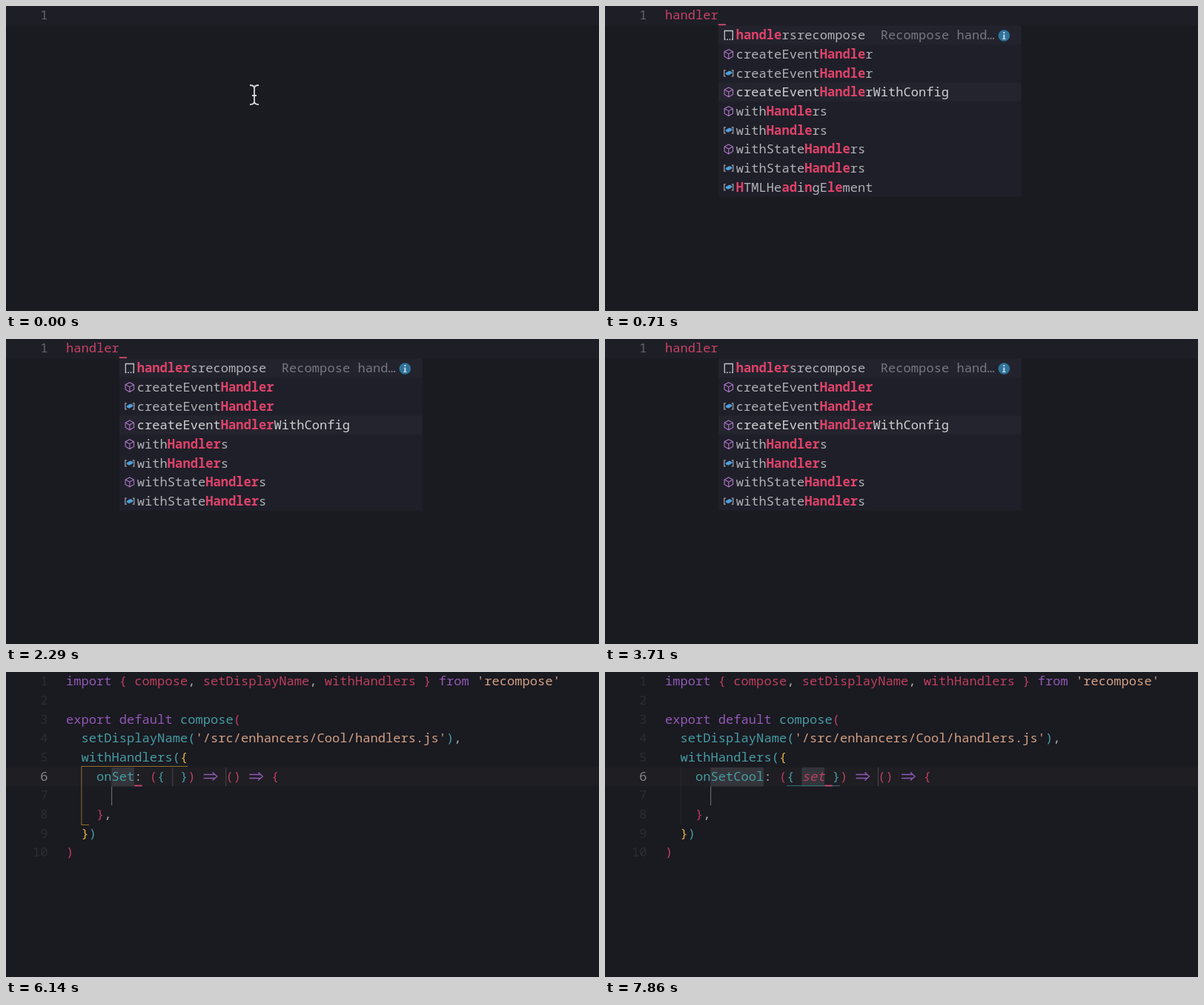
An HTML page with a canvas for the animation above (8000 ms loop, 800 by 412 pixels).

```html
<!DOCTYPE html>
<html>
<head>
<meta charset="utf-8">
<style>
  html, body { margin: 0; height: 100%; overflow: hidden; background: #1a1a21; }
  canvas { display: block; }
</style>
</head>
<body>
<canvas id="stage" width="800" height="412"></canvas>
<script>
const ctx = document.getElementById('stage').getContext('2d');
const LOOP = 8000, CHAR = 10.26, LINE = 25.67, LEFT = 81;
const FONT = '17.1px "Noto Sans Mono", monospace';
const COLORS = { p: '#9159b4', r: '#bd3f5e', t: '#469ca2', s: '#d3a083', y: '#e3b341', g: '#a9a9b0' };

const ACCEPTED = 4400, NEXT_FIELD = 7130;
const typed = [[140, 'h'], [280, 'han'], [425, 'hand'], [565, 'handle'], [705, 'handler']];
const queries = [[280, 'h'], [425, 'han'], [565, 'hand'], [705, 'handle'], [855, 'handler']];
const nameTyped = [[5565, 'S'], [5705, 'Se'], [5855, 'Set'], [6285, 'SetC'], [6425, 'SetCo'], [6565, 'SetCoo'], [6705, 'SetCool']];
const propTyped = [[7425, 's'], [7565, 'se'], [7705, 'set']];

// Asterisks mark the matched letters of loose matches.
const suggestions = [
  ['snippet', 'handlersrecompose'],
  ['cube', 'createEventHandler'], ['value', 'createEventHandler'],
  ['cube', 'createEventHandlerWithConfig'],
  ['cube', 'withHandlers'], ['value', 'withHandlers'],
  ['cube', 'withStateHandlers'], ['value', 'withStateHandlers'],
  ['value', '*H*TMLHe*ad*i*n*gE*le*ment'],
  ['value', '*H*TMLHe*ad*Element'], ['value', '*H*TMLHtmlElement'], ['value', '*H*TMLHRElement']
];

const code = [
  [0, 0, 'p', 'import ', 'r', '{ compose', 'g', ', ', 'r', 'setDisplayName', 'g', ', ', 'r', 'withHandlers } ', 'p', 'from ', 's', "'recompose'"],
  [2, 0, 'p', 'export default ', 't', 'compose', 'r', '('],
  [3, 2, 't', 'setDisplayName(', 's', "'/src/enhancers/Cool/handlers.js'", 't', ')', 'g', ','],
  [4, 2, 't', 'withHandlers(', 'y', '{'],
  [7, 4, 'r', '}', 'g', ','],
  [8, 2, 'y', '}', 't', ')'],
  [9, 0, 'r', ')']
];

const colX = col => LEFT + col * CHAR;
const latest = (steps, t) => steps.reduce((found, [at, value]) => t >= at ? value : found, '');

function rect(x, y, w, h, color) {
  ctx.fillStyle = color;
  ctx.fillRect(x, y, w, h);
}

function text(x, y, str, color, style = '') {
  ctx.font = style + ' ' + FONT;
  ctx.fillStyle = color;
  [...str].forEach((ch, i) => ctx.fillText(ch, x + i * CHAR, y));
  return x + str.length * CHAR;
}

function stroke(path, color, width = 1) {
  ctx.strokeStyle = color;
  ctx.lineWidth = width;
  ctx.stroke(new Path2D(path));
}

function arrow(col, row) {
  const x = colX(col), y = row * LINE + 12.7;
  stroke(`M${x + 1} ${y - 2.5}h15.5M${x + 1} ${y + 2.5}h15.5M${x + 13} ${y - 5.5}l6 5.5l-6 5.5`, COLORS.p, 1.4);
}

function tokens(row, col, parts) {
  for (let i = 0; i < parts.length; i += 2) {
    const str = parts[i + 1];
    if (str === '=>') arrow(col, row);
    else text(colX(col), row * LINE + 18.2, str, COLORS[parts[i][0]], parts[i][1] ? 'italic' : '');
    col += str.length;
  }
}

function lineNumber(row, color) {
  const label = String(row + 1);
  text(56.5 - label.length * CHAR, row * LINE + 18.2, label, color);
}

const caret = (col, row) => rect(colX(col), row * LINE + 24.3, CHAR, 1.8, '#d34b6d');

const icons = {
  snippet(x, y) {
    stroke(`M${x - 5.5} ${y + 6}v-12h11v12`, '#c4c4ca', 1.3);
    for (let i = 0; i < 4; i++) rect(x - 6 + i * 3.4, y + 5, 1.7, 1.6, '#c4c4ca');
  },
  cube(x, y) {
    stroke(`M${x} ${y - 6.5}l5.7 3v6.5l-5.7 3.3l-5.7 -3.3v-6.5zM${x - 5.7} ${y - 3.5}l5.7 3l5.7 -3M${x} ${y - 0.5}v6.8`, '#a672bd', 1.2);
  },
  value(x, y) {
    stroke(`M${x - 4} ${y - 4}h-2v8h2M${x + 4} ${y - 4}h2v8h-2`, '#a5a5ac', 1.2);
    ctx.fillStyle = '#4b9fdb';
    ctx.fill(new Path2D(`M${x - 4} ${y - 0.5}l5 -2.8l3.5 1.5v2l-5 2.8l-3.5 -1.5z`));
  }
};

function label(x, y, name, query, color) {
  const at = name.toLowerCase().indexOf(query);
  const loose = name.includes('*');
  const parts = loose ? name.split('*')
    : [name.slice(0, at), name.slice(at, at + query.length), name.slice(at + query.length)];
  parts.forEach((part, i) => {
    x = text(x, y, part, i % 2 ? '#e0436a' : color, i % 2 ? 'bold' : '');
  });
}

function popup(x, query) {
  const count = { handle: 9, handler: 8 }[query] || 12;
  rect(x, 26.5, 409, count * LINE, '#1f1f29');
  suggestions.slice(0, count).forEach(([icon, name], i) => {
    const top = 26.5 + i * LINE, mid = top + 13;
    if (i === 0 || i === 3) rect(x, top, 409, LINE, i ? '#24242e' : '#22232d');
    icons[icon](x + 14, mid);
    label(x + 24, top + 18.9, name, query, i === 3 ? '#d0d0d5' : '#b1b1b8');
  });
  text(x + 219, 45.4, 'Recompose hand…', '#777780');
  ctx.fillStyle = '#2f7299';
  ctx.beginPath();
  ctx.arc(x + 385.5, 40, 7.8, 0, 7);
  ctx.fill();
  rect(x + 384.5, 35, 2, 2, '#c7dce8');
  rect(x + 384.5, 38.5, 2, 6, '#c7dce8');
  rect(x + 383.3, 44, 4.4, 1, '#c7dce8');
}

function mousePointer() {
  stroke('M329 107q6 0 6 4v18q0 4-6 4M341 107q-6 0-6 4v18q0 4 6 4M332 121h6', '#d8d8da', 1.8);
}

function drawTyping(t) {
  rect(0, 0, 800, 26.3, '#1e1e27');
  lineNumber(0, '#65656d');
  const word = latest(typed, t), query = latest(queries, t);
  if (!word) return mousePointer();
  text(LEFT, 18.2, word, '#c74364');
  if (query) popup(colX(word.length), query);
  if (t < 1285 || (t - 1285) % 1010 >= 505) caret(word.length, 0);
}

function drawSnippet(t) {
  const name = latest(nameTyped, t), prop = latest(propTyped, t);
  const inProp = t >= NEXT_FIELD;
  const end = 6 + name.length, brace = end + 3, field = brace + 2, close = field + prop.length;
  const top = 5 * LINE;

  rect(0, top + 0.5, 800, LINE, '#1e1e23');
  for (let row = 0; row < 10; row++) lineNumber(row, row === 5 ? '#85858b' : '#2c2c33');

  // Snippet fields and guides
  const mark = (col, length, row = 5) =>
    rect(colX(col) - 0.3, row * LINE + 0.5, Math.max(1, length * CHAR), LINE, length ? '#34353a' : '#48494e');
  mark(6, name.length);
  mark(field, prop.length);
  mark(close + 7, 0);
  rect(142, 6 * LINE + 0.5, 1.2, LINE, '#66676b');
  if (inProp) {
    rect(101.7, top, 1, LINE * 3, '#25252c');
    rect(colX(brace), top + 24.8, (close + 2 - brace) * CHAR, 1, '#347378');
  } else {
    stroke('M245 127.5H101.9V206.5H112', '#906f2d', 1);
  }

  code.forEach(([row, col, ...parts]) => tokens(row, col, parts));
  tokens(5, 4, ['t', 'on' + name, 'g', ': ', 'r', '(', 't', '{ ', 'ri', prop, 't', ' }', 'r', ')',
    'g', ' ', 'p', '=>', 'g', ' ', 'r', '()', 'g', ' ', 'p', '=>', 'r', ' {']);

  const lastKey = [ACCEPTED, NEXT_FIELD, ...nameTyped.map(s => s[0]), ...propTyped.map(s => s[0])]
    .filter(at => at <= t).reduce((a, b) => Math.max(a, b));
  if ((t - lastKey) % 1010 < 505) caret(inProp ? close : end, 5);
}

function frame(now) {
  const t = now % LOOP;
  rect(0, 0, 800, 412, '#1a1a21');
  (t < ACCEPTED ? drawTyping : drawSnippet)(t);
  requestAnimationFrame(frame);
}
requestAnimationFrame(frame);
</script>
</body>
</html>
```
